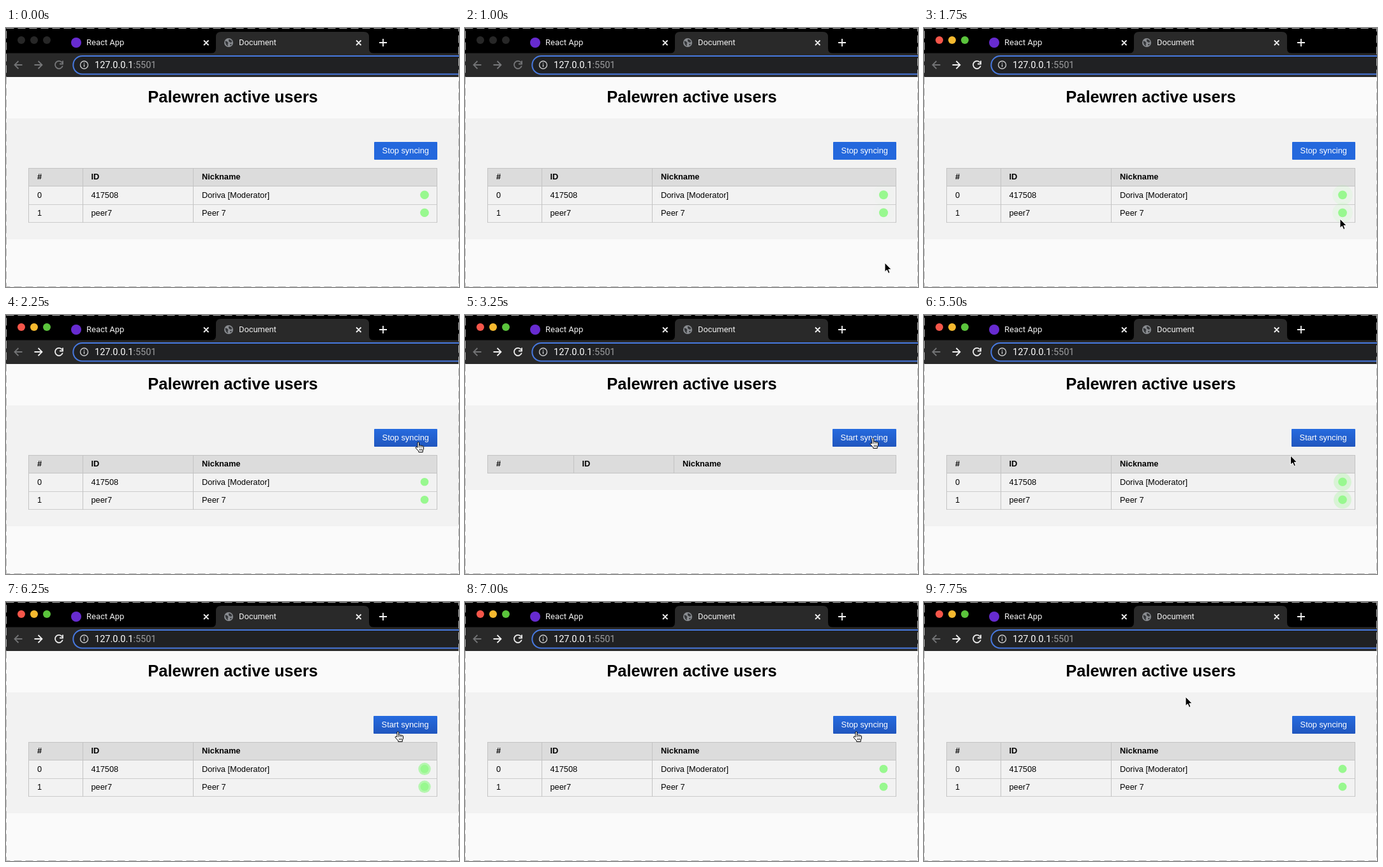
Write an HTML page that moves like this. It is 710x407 px and loops after 8 s.

```html
<!DOCTYPE html>
<html lang="en">
<head>
<meta charset="utf-8">
<title>Active users</title>
<style>
  html, body { margin: 0; width: 100%; height: 100%; overflow: hidden; background: #fafafa; }
  svg { display: block; width: 710px; height: 407px; }
  text { font: 12.8px "Liberation Sans", Arial, sans-serif; white-space: pre; }
  .ui { font: 13px Roboto, sans-serif; fill: #f1f1f1; }
  .url { font: 14.5px Roboto, sans-serif; fill: #fff; }
  .b { font-weight: 700; }
  .line { fill: none; stroke-width: 1.8; }
  .rule { fill: none; stroke: #c3c3c3; }
</style>
</head>
<body>
<svg viewBox="0 0 710 407">
  <defs>
    <linearGradient id="shade" x2="0" y2="1">
      <stop stop-color="#266bdf"/><stop offset="1" stop-color="#2056be"/>
    </linearGradient>
  </defs>

  <!-- browser window -->
  <rect width="710" height="407" fill="#fafafa"/>
  <rect width="710" height="40" fill="#000"/>
  <path d="M321 40q8 0 8-8V14q0-8 8-8h224q8 0 8 8v18q0 8 8 8z" fill="#292929"/>
  <rect y="39.500" width="710" height="37.500" fill="#292929"/>
  <g id="lights">
    <circle cx="24" cy="19" r="6"/><circle cx="44" cy="19" r="6"/><circle cx="64" cy="19" r="6"/>
  </g>
  <circle cx="110" cy="23" r="8" fill="#672bd0"/>
  <text class="ui" x="126" y="27">React App</text>
  <circle cx="349" cy="23" r="7" fill="#898c90"/>
  <path d="M343.500 20.500l3 .5 2 2.500-1 2 .5 3q-4-1.500-4.500-8zM349 17.500l4 1.500 1.500 3-2.500 1-3-2zM351 25l3 0-2 3z" fill="#35373a"/>
  <text class="ui" x="365" y="27" style="font-size:12.8px">Document</text>
  <path d="M310 19.500l7.500 7.500m0-7.500l-7.500 7.500M549 19.500l7.500 7.500m0-7.500l-7.500 7.500M585 23h12m-6-6v12" class="line" stroke="#f4f4f4"/>
  <path d="M25.500 58h-12m6-6l-6 6 6 6" class="line" stroke="#737476"/>
  <g id="nav" class="line">
    <path d="M44.500 58h12m-6-6l6 6-6 6"/>
    <path d="M87.800 54.200a6 6 0 1 0 1 5.300M89 51.500v5h-5"/>
  </g>
  <path d="M720 44H119.500a14.200 14.200 0 0 0 0 28.400H720" fill="#202123" stroke="#4779e0" stroke-width="2"/>
  <circle cx="122.500" cy="58" r="6" class="line" stroke="#c9cacb" style="stroke-width:1.4"/>
  <path d="M122.500 57v4.200M122.500 54.400v1.500" class="line" stroke="#c9cacb" style="stroke-width:1.4"/>
  <text class="url" x="139" y="63">127.0.0.1<tspan fill="#9b9c9e">:5501</tspan></text>

  <!-- page -->
  <text class="b" x="355.500" y="117" text-anchor="middle" style="font-size:25.5px">Palewren active users</text>
  <rect id="section" y="142" width="710" fill="#f2f2f2"/>
  <rect id="button" y="179" height="28" rx="1"/>
  <text id="label" y="197" fill="#fff"></text>
  <rect x="35.500" y="220.500" width="640" height="28" fill="#dcdcdc" stroke="#c3c3c3"/>
  <g id="rows"></g>
  <path id="cols" class="rule"/>
  <text class="b" x="49" y="238">#</text>
  <text class="b" id="idHead" y="238">ID</text>
  <text class="b" id="nickHead" y="238">Nickname</text>
  <rect x=".5" y=".5" width="709" height="406" fill="none" stroke="#b4b4b4" stroke-dasharray="12 6"/>

  <!-- pointers -->
  <path id="arrow" d="M0 0V14.300L3.300 11.300 5.600 16.500 8 15.500 5.800 10.400H10.200Z" fill="#000" stroke="#fff"/>
  <g id="hand">
    <path d="M4 9.300V1.900a1.200 1.200 0 0 1 2.500 0V6q1.300-.9 2.400.3 1.400-.7 2.300.5 1.900-.6 2.300 1V11q0 1.500-1.300 3v2.500H5.800V15L1.300 10.200Q.5 8.800 1.800 8.300 2.800 8 4 9.300Z" fill="#fff" stroke="#000" stroke-linejoin="round"/>
    <path d="M6.500 6v3.500M8.900 6.500v3M11.200 7v2.500M7.300 11.200v3M9.200 11.200v3M11 11.200v3" stroke="#000" stroke-width=".8"/>
  </g>
</svg>
<script>
const LOOP = 8000, STEP = 250, PULSE = 880;
const $ = id => document.getElementById(id);
const set = (el, attrs) => { for (const k in attrs) el.setAttribute(k, attrs[k]); };

const people = [['0', '417508', 'Doriva [Moderator]'], ['1', 'peer7', 'Peer 7']];
$('rows').innerHTML = people.map(([n, id, nick], i) => {
  const y = 267 + i * 28.3, cy = 262.3 + i * 28;
  return `<path class="rule" d="M35.5 ${277.5 + i * 28}H675.5" stroke-opacity=".8"/>
    <text x="49" y="${y}">${n}</text><text x="133.5" y="${y}">${id}</text><text x="307" y="${y}">${nick}</text>
    <circle class="halo" cx="656" cy="${cy}" fill="#98f88f"/><circle class="dot" cx="656" cy="${cy}" fill="#98f88f"/>`;
}).join('');
const halos = document.querySelectorAll('.halo'), dots = document.querySelectorAll('.dot');
const lights = [...$('lights').children];

// pointer stops: time, x, y, shape
const path = [
  [750, 684, 336, 'arrow'], [1000, 658, 369, 'arrow'], [1500, 657, 368, 'arrow'],
  [1750, 652, 300, 'arrow'], [2000, 648, 216, 'arrow'], [2250, 641, 199, 'hand'],
  [2500, 639, 197, 'hand'], [3250, 634, 193, 'hand'], [3500, 634, 196, 'hand'],
  [3750, 632, 212, 'arrow'], [4000, 622, 214, 'arrow'], [4500, 614, 213, 'arrow'],
  [5000, 551, 229, 'arrow'], [5250, 553, 228, 'arrow'], [5750, 596, 214, 'arrow'],
  [6000, 610, 204, 'hand'], [6250, 609, 203, 'hand'], [7000, 608, 203, 'hand'],
  [7250, 600, 201, 'hand'], [7500, 578, 199, 'hand'], [7750, 410, 149, 'arrow']
];
// the list empties, then comes back and its pulse restarts
const gaps = [[250, 500], [3250, 3500], [6750, 7000]];
const starts = [[0, -40], [500, 500], [3500, 3480], [7000, 7000]];

function pointer(t) {
  const i = path.findLastIndex(p => p[0] <= t);
  if (i < 0) return null;
  const a = path[i], b = path[i + 1] || a;
  const k = b === a ? 0 : (t - a[0]) / (b[0] - a[0]);
  return { x: a[1] + (b[1] - a[1]) * k, y: a[2] + (b[2] - a[2]) * k, shape: a[3] };
}

// cubic-bezier(.25, .1, .25, 1)
function ease(x) {
  let lo = 0, hi = 1;
  const curve = (p, q, u) => 3 * p * u * (1 - u) ** 2 + 3 * q * u * u * (1 - u) + u ** 3;
  for (let n = 0; n < 20; n++) {
    const mid = (lo + hi) / 2;
    if (curve(.25, .25, mid) < x) lo = mid; else hi = mid;
  }
  return curve(.1, 1, lo);
}

function pulse(t) {
  const from = starts.findLast(s => s[0] <= t)[1];
  const p = (t - from) % PULSE / PULSE;
  const grow = p < .7 ? ease(p / .7) : 1 - ease((p - .7) / .3);
  const r = 6.3 + .7 * grow;
  dots.forEach(d => set(d, { r }));
  halos.forEach(h => set(h, { r: r + 10 * grow, opacity: p < .7 ? 1 - grow : 0 }));
}

function draw(t) {
  const active = t >= 1250;
  const colors = active ? ['#f5564a', '#f5b92f', '#5bc43c'] : Array(3).fill('#272727');
  lights.forEach((l, i) => set(l, { fill: colors[i] }));
  set($('nav'), { stroke: active ? '#f0f0f0' : '#77787a' });

  const stopped = t >= 3000 && t < 6750;
  const left = stopped ? 576 : 577;
  set($('button'), { x: left, width: 676 - left, fill: t < 2000 ? '#2468dd' : 'url(#shade)' });
  set($('label'), { x: left + 12.6 });
  $('label').textContent = stopped ? 'Start syncing' : 'Stop syncing';

  const empty = gaps.some(([a, b]) => t >= a && t < b);
  const [c1, c2] = empty ? [170.5, 327.5] : [120.5, 293.5];
  const end = empty ? 249 : 306;
  set($('section'), { height: empty ? 133 : 190 });
  set($('cols'), { d: [35.5, c1, c2, 675.5].map(x => `M${x} 220V${end}`).join('') });
  set($('idHead'), { x: c1 + 13 });
  set($('nickHead'), { x: c2 + 13.5 });
  set($('rows'), { visibility: empty ? 'hidden' : 'visible' });
  pulse(t);

  const p = pointer(t);
  for (const shape of ['arrow', 'hand']) {
    const on = p && p.shape === shape;
    set($(shape), { visibility: on ? 'visible' : 'hidden' });
    if (on) set($(shape), { transform: `translate(${p.x} ${p.y})` });
  }
}

const begin = performance.now();
function tick() {
  const t = (performance.now() - begin) % LOOP;
  draw(Math.floor(t / STEP) * STEP);
  requestAnimationFrame(tick);
}
tick();
</script>
</body>
</html>
```
